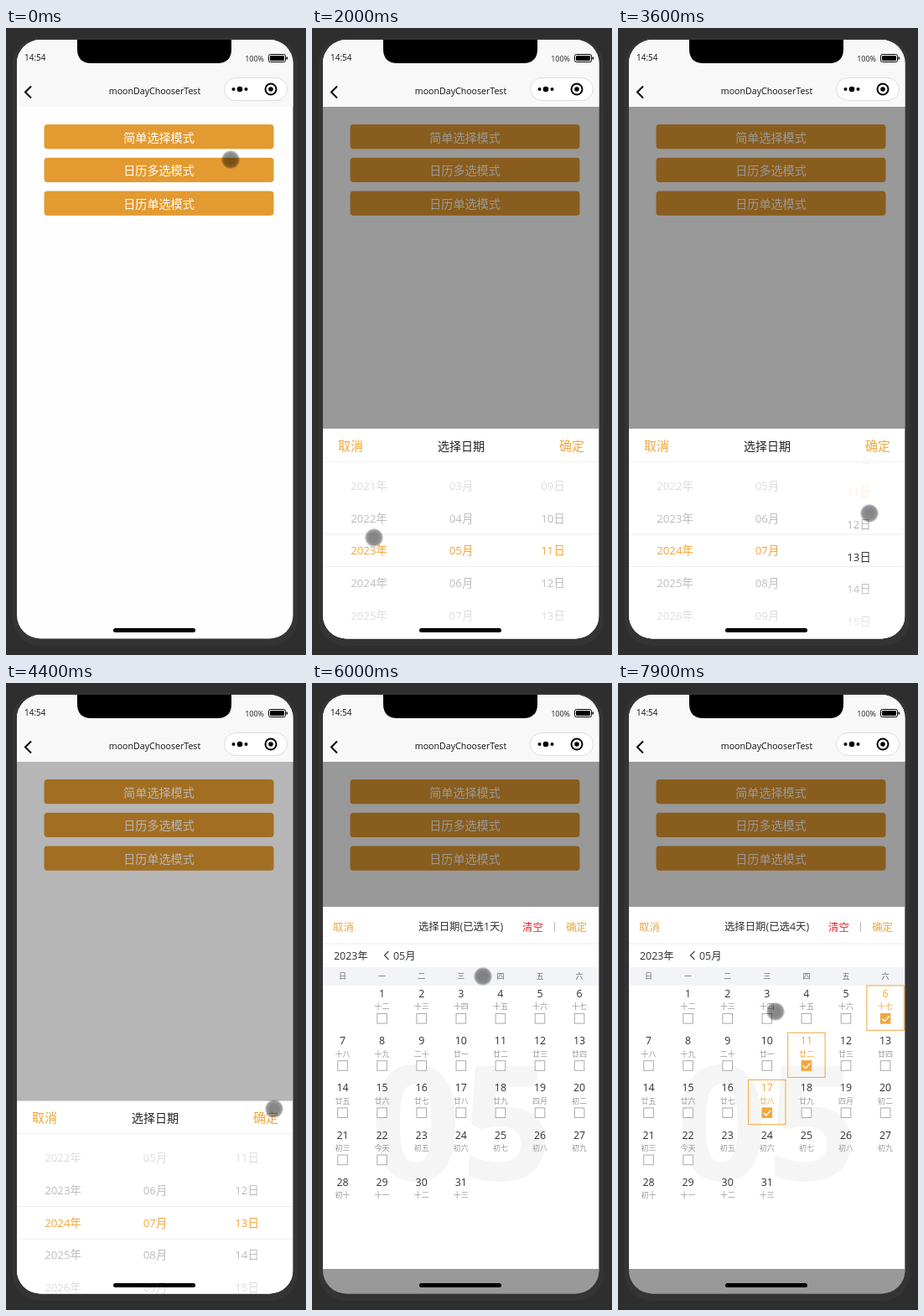
Animation of 358 by 748 pixels, one loop 8000 ms. Source, as an HTML page:

```html
<!DOCTYPE html>
<html lang="zh-CN">
<head>
<meta charset="utf-8">
<style>
  html, body { margin: 0; width: 100%; height: 100%; overflow: hidden; background: #2e2e2e; }
  svg { display: block; width: 358px; height: 748px; font-family: 'Open Sans', 'Noto Sans CJK SC', 'Noto Sans CJK', sans-serif; }
</style>
</head>
<body>
<svg id="stage" viewBox="0 0 358 748"></svg>
<script>
const ORANGE = '#f2a63b', INK = '#303133';
const stage = document.getElementById('stage');

// Markup helpers; text is placed by its visual centre line
const rect = (x, y, w, h, fill, r = 0, extra = '') =>
  `<rect x="${x}" y="${y}" width="${w}" height="${h}" rx="${r}" fill="${fill}" ${extra}/>`;
const circle = (x, y, r, extra = '') => `<circle cx="${x}" cy="${y}" r="${r}" ${extra}/>`;
const stroke = (d, color, width = 1) => `<path d="${d}" fill="none" stroke="${color}" stroke-width="${width}"/>`;
const text = (s, x, y, size, fill, anchor = 'middle', extra = '') =>
  `<text x="${x}" y="${y + size * .37}" font-size="${size}" fill="${fill}" text-anchor="${anchor}" ${extra}>${s}</text>`;
const range = (n, f) => Array.from({ length: n }, (_, i) => f(i));
const pad = n => String(n).padStart(2, '0');

// Wheel picker
const ROW = 38.7, MID = 623.3;
const columns = [
  { x: 68, first: 2018, count: 11, start: 2023, unit: '年', keys: [[2000, 0], [2200, .55], [2400, .95], [2500, 1]], settle: 2600, move: 1 },
  { x: 178, first: 1, count: 12, start: 5, unit: '月', keys: [[2700, 0], [2900, 1.3], [3100, 1.95], [3200, 2]], settle: 3200, move: 2 },
  { x: 287.5, first: 1, count: 31, start: 11, unit: '日', keys: [[3300, 0], [3500, 1.4], [3600, 1.81], [3800, 2]], settle: 3900, move: 2 },
];
const wheel = c => `<g class="wheel">${range(c.count, i =>
  text(pad(c.first + i) + c.unit, c.x, MID + (c.first + i - c.start) * ROW, 13.3, INK)).join('')}</g>`;

const picker = `<g id="picker">
  ${rect(13, 478, 329, 251, '#fff')}
  ${text('取消', 31, 498, 15, ORANGE, 'start')}
  ${text('选择日期', 178, 498.5, 14, '#222')}
  ${text('确定', 325, 498, 15, ORANGE, 'end')}
  <g clip-path="url(#wheels)">
    ${columns.map(wheel).join('')}
    ${rect(13, 517, 329, 87, 'url(#fadeTop)')}
    ${rect(13, 642, 329, 87, 'url(#fadeBottom)')}
  </g>
  ${stroke('M13 517H342M13 604H342M13 642.5H342', '#eee')}
</g>`;

// Calendar
const TODAY = 22, DIGITS = '十一二三四五六七八九';
function lunar(d) {
  if (d === 19) return '四月';
  if (d === TODAY) return '今天';
  const n = d < 19 ? d + 11 : d - 18, digit = DIGITS[n % 10];
  if (n === 20) return '二十';
  return (n <= 10 ? '初' : n < 20 ? '十' : '廿') + digit;
}
const colX = i => 36.5 + 47.1 * i;
function dayCell(d) {
  const x = colX(d % 7), y = 370.5 + 56.2 * Math.floor(d / 7);
  const box = (fill, line) => rect(x - 5.8, y + 24, 11.6, 11.6, fill, 0, `stroke="${line}"`);
  const face = color => text(d, x, y, 12.4, color || INK) + text(lunar(d), x, y + 15.5, 9, color || '#999');
  if (d > TODAY) return face();
  return `<g id="off${d}">${face()}${box('#fff', '#aaa')}</g>
    <g id="on${d}" visibility="hidden">${face(ORANGE)}${box(ORANGE, ORANGE)}
      ${stroke(`M${x - 4} ${y + 30}l3 3l5.5 -6`, '#fff', 1.5)}
      ${rect(x - 22.2, y - 9.5, 44.4, 53.3, 'none', 0, `stroke="${ORANGE}"`)}</g>`;
}
const calendar = `<g id="calendar">
  ${rect(13, 267, 329, 432, '#fff')}
  ${text('05', 178, 523, 190, '#f5f5f5', 'middle', 'font-weight="700"')}
  ${text('取消', 25, 291, 12.4, ORANGE, 'start')}
  ${text('', 177.5, 290, 12.4, INK, 'middle', 'id="count"')}
  ${text('清空', 251, 291, 12.4, '#e3262b', 'start')}
  ${stroke('M289.5 285V297', '#bbb')}
  ${text('确定', 328, 291, 12.4, ORANGE, 'end')}
  ${stroke('M13 311H342', '#eee')}
  ${text('2023年', 26, 325.5, 12.4, INK, 'start')}
  ${stroke('M91.5 320L86.5 325L91.5 330', '#444', 1.2)}
  ${text('05月', 97, 325.5, 12.4, INK, 'start')}
  ${rect(13, 339, 329, 22, '#f3f4f7')}
  ${range(7, i => text('日一二三四五六'[i], colX(i), 350, 9, '#666')).join('')}
  ${range(31, i => dayCell(i + 1)).join('')}
</g>`;

const fade = (id, from, to) => `<linearGradient id="${id}" x2="0" y2="1">
  <stop stop-color="#fff" stop-opacity="${from}"/><stop offset="1" stop-color="#fff" stop-opacity="${to}"/></linearGradient>`;

stage.innerHTML = `<defs>
    ${fade('fadeTop', .95, .6)}${fade('fadeBottom', .6, .95)}
    <radialGradient id="touch">
      <stop offset=".5" stop-opacity=".47"/><stop offset=".8" stop-opacity=".4"/><stop offset="1" stop-opacity=".1"/>
    </radialGradient>
    <clipPath id="body">${rect(13, 14, 329.5, 714.5, '#000', 28)}</clipPath>
    <clipPath id="wheels">${rect(13, 518, 329, 211, '#000')}</clipPath>
  </defs>
  ${rect(0, 0, 358, 748, '#2e2e2e')}
  ${rect(8, 12, 340, 725, '#343434', 32)}
  <g clip-path="url(#body)">
    ${rect(13, 14, 330, 715, '#fefefe')}
    ${['简单选择模式', '日历多选模式', '日历单选模式'].map((s, i) =>
      rect(45.5, 115 + 39.7 * i, 274, 29.3, '#e39a30', 4) + text(s, 182.5, 130.5 + 39.7 * i, 14.1, '#fff')).join('')}
    ${rect(13, 94, 330, 635, '#000', 0, 'id="shade"')}
    ${picker}${calendar}
    ${rect(13, 14, 330, 80, '#f8f8f8')}
    <path d="M85 14H269V25Q269 42 252 42H102Q85 42 85 25Z"/>
    ${rect(128, 716, 98, 5, '#000', 2.5)}
  </g>
  ${text('14:54', 22, 35, 10, '#111', 'start')}
  ${text('100%', 308, 37, 9, '#222', 'end')}
  ${rect(313.5, 31.5, 20, 9, '#fff', 2, 'stroke="#000"')}
  ${rect(315, 33, 17, 6, '#000', 1)}
  ${rect(334.5, 34.5, 1.5, 3, '#000')}
  ${stroke('M30 69.5L23 76.5L30 83.5', '#000', 2)}
  ${text('moonDayChooserTest', 177.5, 75.5, 10.6, '#111')}
  ${rect(260.5, 59.5, 75, 27, '#fff', 13.5, 'stroke="#ddd"')}
  ${circle(271.5, 73, 2)}${circle(279, 73, 3.3)}${circle(286.5, 73, 2)}
  ${circle(316, 73, 6.5, 'fill="none" stroke="#000" stroke-width="2"')}${circle(316, 73, 2.8)}
  ${circle(0, 0, 11, 'id="cursor" fill="url(#touch)"')}`;

const el = id => document.getElementById(id);
const shift = (node, x, y) => node.setAttribute('transform', `translate(${x} ${y})`);
const wheels = [...document.querySelectorAll('.wheel')];

const ramp = (t, a, b) => Math.min(1, Math.max(0, (t - a) / (b - a)));
// Linear interpolation between [time, ...values] keys
function track(t, keys) {
  let i = 0;
  while (i < keys.length - 2 && t >= keys[i + 1][0]) i++;
  const [a, b] = [keys[i], keys[i + 1]], p = ramp(t, a[0], b[0]);
  return a.slice(1).map((v, k) => v + (b[k + 1] - v) * p);
}

const cursorPath = [
  [0, 268, 157], [200, 260, 163], [400, 222, 147], [600, 196, 135], [700, 196, 135], [800, 196, 137],
  [1100, 196, 137], [1300, 197, 135], [1500, 170, 250], [1800, 90, 570], [2000, 74, 608], [2400, 76, 570],
  [2700, 183, 640], [3100, 188, 570], [3300, 298, 648], [3500, 299, 595], [3600, 300, 579], [3800, 301, 572],
  [4200, 320, 508], [4400, 320, 508], [4800, 245, 250], [5000, 229, 187], [5100, 229, 187], [5200, 230, 188],
  [5800, 230, 188], [6200, 178, 512], [6400, 178, 512], [6600, 251, 455], [6700, 251, 457], [6800, 251, 457],
  [6900, 267, 459], [7100, 225, 457], [7200, 226, 457], [7300, 315, 406], [7500, 315, 408], [7600, 292, 425],
  [7900, 188, 392],
];
const picks = { 17: 6400, 11: 7200, 6: 7500 };

function render(t) {
  const open = ramp(t, 1115, 1385), close = ramp(t, 4320, 4600), open2 = ramp(t, 5715, 5985);
  shift(el('picker'), 0, 252 * ((1 - open) ** 3 + close ** 2));
  shift(el('calendar'), 0, 463 * (1 - open2) ** 3);
  el('shade').setAttribute('opacity', .4 * (open - close + open2));

  columns.forEach((c, k) => {
    shift(wheels[k], 0, -ROW * track(t, c.keys)[0]);
    const chosen = c.start - c.first + (t >= c.settle ? c.move : 0);
    [...wheels[k].children].forEach((n, i) => n.setAttribute('fill', i === chosen ? ORANGE : INK));
  });

  let count = 1;
  for (const d in picks) {
    const on = t >= picks[d];
    count += on;
    el('on' + d).setAttribute('visibility', on ? 'visible' : 'hidden');
    el('off' + d).setAttribute('visibility', on ? 'hidden' : 'visible');
  }
  el('count').textContent = `选择日期(已选${count}天)`;
  shift(el('cursor'), ...track(t, cursorPath));
}

// The screen refreshes ten times a second
const begin = performance.now();
function tick() {
  render(Math.floor((performance.now() - begin) % 8000 / 100) * 100);
  requestAnimationFrame(tick);
}
tick();
</script>
</body>
</html>
```
